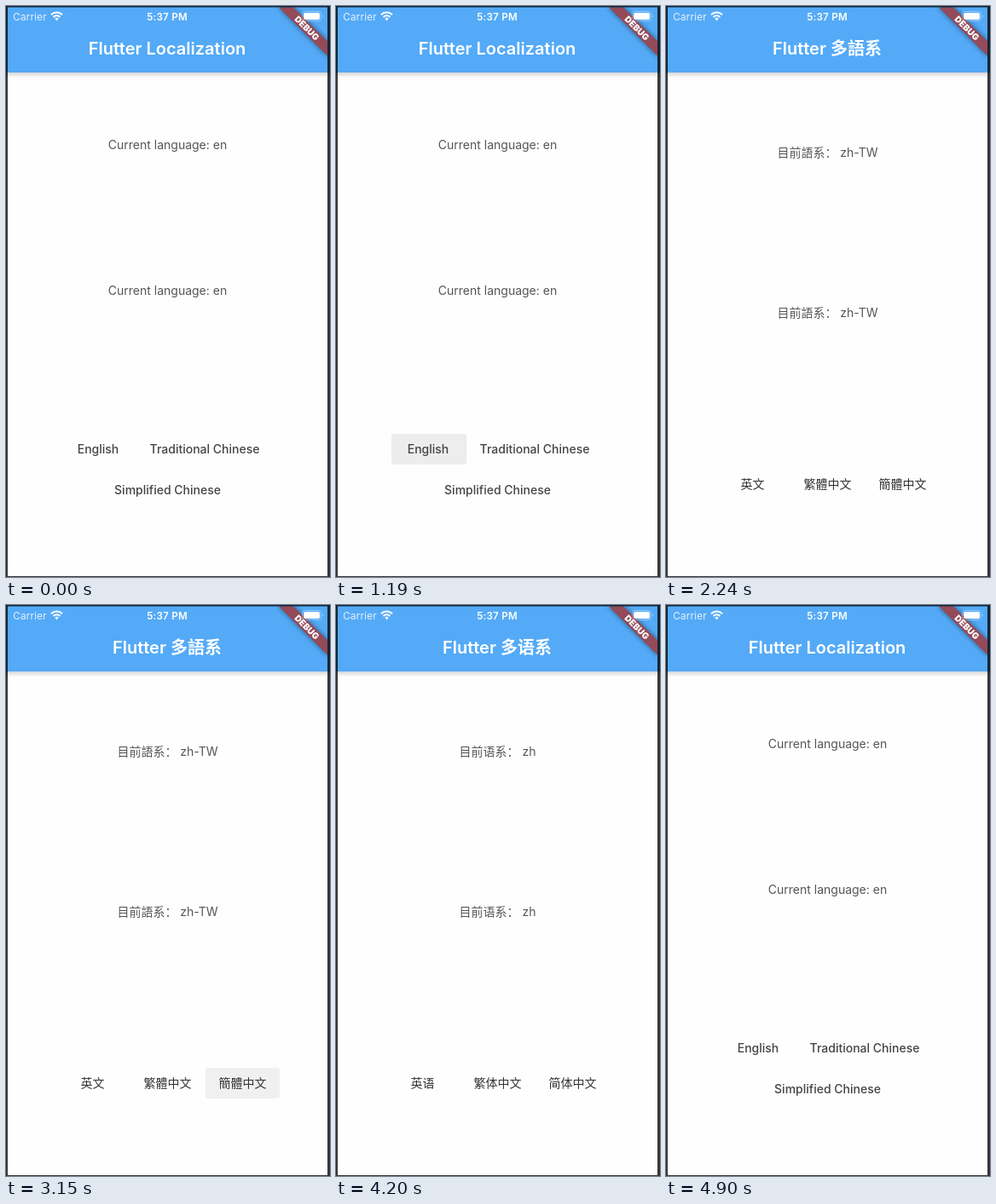
Animation, 380 px wide and 670 px high, one loop 4970 ms. Source, as an HTML page:

```html
<!DOCTYPE html>
<html lang="en">
<head>
<meta charset="utf-8">
<title>Localization demo</title>
<style>
  html, body { margin: 0; width: 100%; height: 100%; overflow: hidden; background: #33363c; }
  svg { display: block; width: 380px; height: 670px; }
  text { font-family: Inter, "Noto Sans CJK SC", "Noto Sans CJK", sans-serif; text-anchor: middle; }
  .title { font-size: 20px; font-weight: 600; fill: #fff; }
  .body { font-size: 14px; fill: #555; }
  .button { font-size: 14px; font-weight: 500; fill: #444; }
  .zh .button { fill: #333; }
  .status { font-size: 11.6px; fill: #fff; letter-spacing: .25px; }
  .banner { font-size: 10.2px; font-weight: 900; fill: #fff; }
</style>
</head>
<body>
<svg viewBox="0 0 380 670">
  <defs>
    <clipPath id="buttonClip"><rect id="clipBox" rx="2"/></clipPath>
    <clipPath id="screen"><rect x="2" y="1.5" width="375" height="667.5"/></clipPath>
    <linearGradient id="shade" x2="0" y2="1">
      <stop stop-color="#000" stop-opacity=".16"/>
      <stop offset=".6" stop-color="#000" stop-opacity=".07"/>
      <stop offset="1" stop-color="#000" stop-opacity="0"/>
    </linearGradient>
    <filter id="blur" x="-20%" y="-100%" width="140%" height="300%">
      <feGaussianBlur stdDeviation="3"/>
    </filter>
  </defs>
  <rect width="380" height="670" fill="#fefefe"/>
  <rect y="78" width="380" height="6" fill="url(#shade)"/>
  <rect width="380" height="78" fill="#54aaf7"/>
  <g id="press" clip-path="url(#buttonClip)">
    <rect id="highlight" rx="2"/>
    <circle id="splash"/>
  </g>
  <g id="pages"></g>
  <g clip-path="url(#screen)">
    <g transform="translate(377 2) rotate(45)">
      <rect x="-40" y="28" width="80" height="12" opacity=".5" filter="url(#blur)"/>
      <rect x="-40" y="28" width="80" height="12" fill="#944a58"/>
      <text class="banner" x="0" y="37.7">DEBUG</text>
    </g>
  </g>
  <text class="status" x="28" y="16.5" opacity=".85">Carrier</text>
  <text class="status" x="189" y="16.5" font-weight="600">5:37 PM</text>
  <g fill="none" stroke="#fff" stroke-width="2">
    <path d="M53 10.2a9.2 9.2 0 0 1 13 0M55.6 13a5.4 5.4 0 0 1 7.8 0"/>
    <path d="M57.4 14.8a3 3 0 0 1 4.2 0L59.5 17.5z" fill="#fff" stroke="none"/>
  </g>
  <rect x="347.5" y="6.5" width="22" height="11" rx="3" fill="none" stroke="#fff" opacity=".35"/>
  <rect x="349" y="8" width="19" height="8" rx="2" fill="#fff"/>
  <path d="M371 10.5q2 1.5 0 3z" fill="#fff" opacity=".5"/>
  <path d="M0 0H380V670H0zM2 1.5V669H377V1.5z" fill="#000103" fill-rule="evenodd" opacity=".79"/>
</svg>
<script>
const LOOP = 4970, STEP = 70;
const byId = id => document.getElementById(id);

// Each label is [text, centre x, baseline].
const englishButtons = [
  ["English", 108, 524.5], ["Traditional Chinese", 233, 524.5], ["Simplified Chinese", 189.5, 572.5]
];
const chineseButtons = names => names.map((name, i) => [name, [101.5, 189.5, 277.5][i], 566]);

const pages = [
  { from: 0, title: "Flutter Localization", body: "Current language: en", rows: [168, 339],
    buttons: englishButtons },
  { from: 2170, title: "Flutter 多語系", body: "目前語系： zh-TW", rows: [177, 364.5], zh: true,
    buttons: chineseButtons(["英文", "繁體中文", "簡體中文"]) },
  { from: 3290, title: "Flutter 多语系", body: "目前语系： zh", rows: [177, 364.5], zh: true,
    buttons: chineseButtons(["英语", "繁体中文", "简体中文"]) },
  { from: 4550, same: 0 }
];

// Button box, touch point and highlight strength for each step of a tap.
const presses = [
  { at: 910, x: 65, y: 502, w: 88, tap: [110, 519], levels: [.02, .06, .1, .1, .065] },
  { at: 1820, x: 153, y: 502, w: 160, tap: [222, 519], levels: [0, .05, .09, .1, .06] },
  { at: 2940, x: 234, y: 543, w: 87, tap: [278, 561], levels: [.03, .08, .09, .053, .02] },
  { at: 4340, x: 58, y: 543, w: 88, tap: [102, 561], levels: [.03, .09, .055] }
];

function set(node, values) {
  for (const [name, value] of Object.entries(values)) node.setAttribute(name, value);
  return node;
}

function add(parent, tag, values, text = "") {
  const node = document.createElementNS("http://www.w3.org/2000/svg", tag);
  node.textContent = text;
  return parent.appendChild(set(node, values));
}

const groups = pages.filter(page => page.title).map(page => {
  const group = add(byId("pages"), "g", { class: page.zh ? "zh" : "en" });
  const label = (kind, text, x, y) => add(group, "text", { class: kind, x, y }, text);
  label("title", page.title, 189, 57);
  page.rows.forEach(y => label("body", page.body, 189.5, y));
  page.buttons.forEach(button => label("button", ...button));
  return group;
});

function drawPress(time) {
  const press = presses.find(p => time >= p.at && time < p.at + p.levels.length * STEP);
  byId("press").style.display = press ? "" : "none";
  if (!press) return;
  const step = (time - press.at) / STEP;
  const level = press.levels[step];
  const box = { x: press.x, y: press.y, width: press.w, height: 36 };
  set(byId("clipBox"), box);
  set(byId("highlight"), { ...box, opacity: level });
  const fading = step > 0 && level < press.levels[step - 1];
  set(byId("splash"), {
    cx: press.tap[0], cy: press.tap[1], r: 5 + 16 * step,
    opacity: fading ? 0 : .035
  });
}

function draw(now) {
  const time = Math.floor(now % LOOP / STEP) * STEP;
  const index = pages.findLastIndex(page => time >= page.from);
  const current = pages[index].same ?? index;
  groups.forEach((group, i) => { group.style.display = i === current ? "" : "none"; });
  drawPress(time);
}

const start = performance.now();
function tick() {
  draw(performance.now() - start);
  requestAnimationFrame(tick);
}
tick();
</script>
</body>
</html>
```
